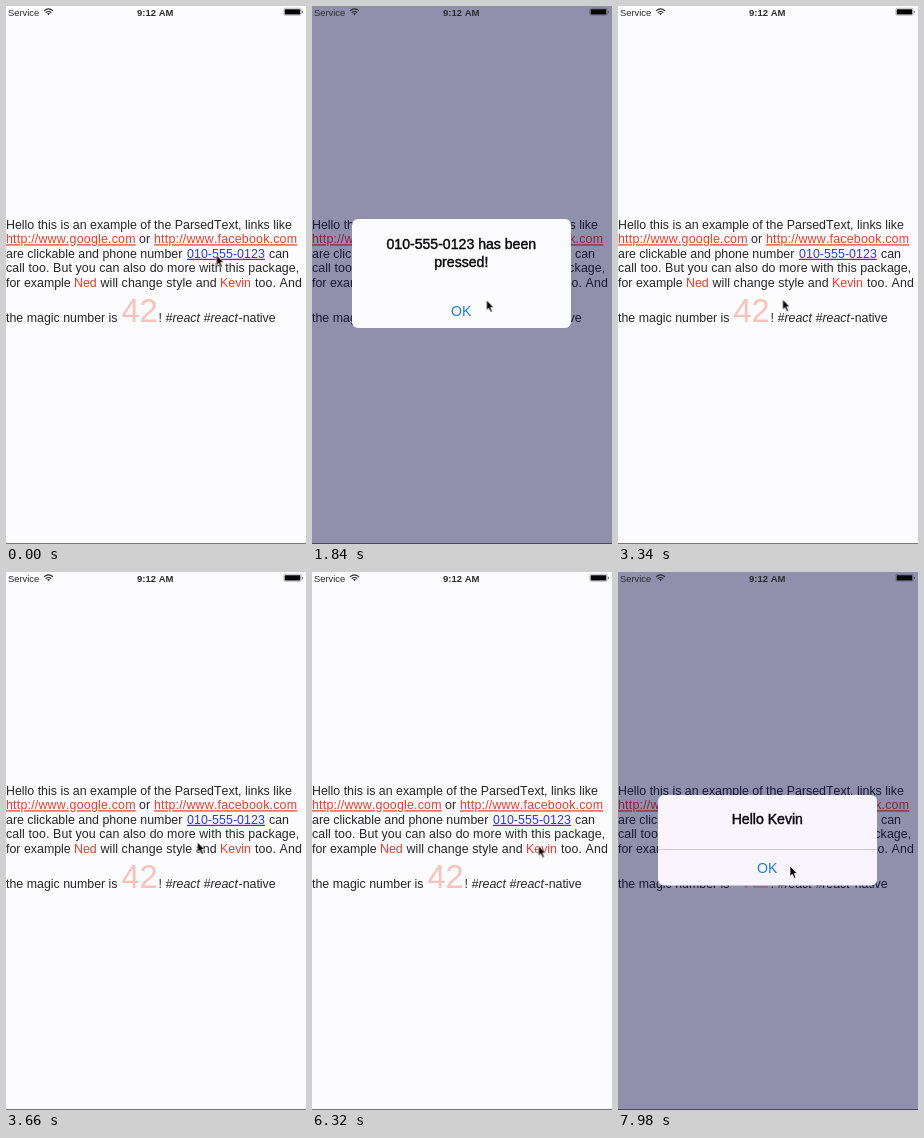
These frames come from a looping animation (300 px wide and 538 px high, 8000 ms). An HTML page:

```html
<!DOCTYPE html>
<html lang="en">
<head>
<meta charset="utf-8">
<title>ParsedText demo</title>
<style>
  html, body { margin: 0; width: 100%; height: 100%; overflow: hidden; background: #fcfcfe; }
  svg { display: block; width: 100%; height: 100%; }
  text { font-family: "Liberation Sans", Arial, sans-serif; font-kerning: none; white-space: pre; }

  .body { font-size: 12.4px; fill: #26262a; }
  .link, .name { fill: #f03c2a; }
  .link { text-decoration: underline; letter-spacing: .21px; }
  .phone { fill: #2a38e8; text-decoration: underline; letter-spacing: .06px; }
  .magic { font-size: 32.6px; fill: #f9c2b8; }
  .tag { font-style: italic; }
  .loose { letter-spacing: .09px; }
  .status { font-size: 9.4px; fill: #2c2c30; }

  .title, .ok { font-size: 14.1px; text-anchor: middle; }
  .title { fill: #050508; stroke: #050508; stroke-width: .4px; }
  .ok { fill: #1a7cf4; }

  .dim, .alert, .rule, .cursor { animation: 8s linear infinite both; }
  .dim { animation-name: dim; }
  .alert { transform-origin: 149.5px 268px; }
  .call { animation-name: call; }
  .greet { animation-name: greet; fill: #f8f5fe; }
  .rule { animation-name: rule; }
  .cursor { animation-name: cursor; }

  @keyframes dim {
    0%, 13.125% { fill: rgba(5, 5, 70, 0); }
    16.625% { fill: rgba(5, 10, 70, .43); }
    18.125%, 37.25% { fill: rgba(5, 5, 70, .44); }
    38.25% { fill: rgba(10, 40, 20, .33); }
    41.25%, 80.25% { fill: rgba(5, 5, 70, 0); }
    83.75% { fill: rgba(5, 10, 70, .43); }
    85.25%, 100% { fill: rgba(5, 5, 70, .44); }
  }
  @keyframes call {
    0%, 13.125% { opacity: 0; transform: scale(1.2); fill: #fcfbfe; }
    16.625% { opacity: .92; transform: scale(1.018); }
    18.125%, 37.25% { opacity: 1; transform: none; fill: #fcfbfe; }
    38.25% { opacity: .86; transform: none; fill: #e8e6ff; }
    41.25%, 100% { opacity: 0; transform: none; fill: #e8e6ff; }
  }
  @keyframes greet {
    0%, 80.25% { opacity: 0; transform: scale(1.2); }
    83.75% { opacity: .92; transform: scale(1.018); }
    85.25%, 100% { opacity: 1; transform: none; }
  }
  @keyframes rule {
    0%, 84% { opacity: 0; }
    86%, 100% { opacity: 1; }
  }
  @keyframes cursor {
    0%, 17% { transform: translate(210.5px, 249px); animation-timing-function: ease-in-out; }
    23%, 25% { transform: translate(174.5px, 294px); animation-timing-function: ease-in-out; }
    31%, 39.5% { transform: translate(154.5px, 302px); animation-timing-function: ease-in-out; }
    45.75%, 47% { transform: translate(191.5px, 270px); animation-timing-function: ease-in-out; }
    53%, 86% { transform: translate(226.5px, 273.5px); animation-timing-function: ease-in-out; }
    95%, 100% { transform: translate(172px, 294px); }
  }
</style>
</head>
<body>
<svg viewBox="0 0 300 538" preserveAspectRatio="none">
  <rect width="300" height="538" fill="#fcfcfe"/>

  <g class="body">
    <text y="222.8">Hello this is an example of the ParsedText, links like</text>

    <text class="link" y="237.3">http://www.google.com</text>
    <text x="133" y="237.3">or</text>
    <text class="link" x="148" y="237.3">http://www.facebook.com</text>

    <text y="251.8">are clickable and phone number</text>
    <text class="phone" x="181" y="251.8">010-555-0123</text>
    <text x="263" y="251.8">can</text>

    <text class="loose" y="266.3">call too. But you can also do more with this package,</text>

    <text y="280.8">for example</text>
    <text class="name" x="68" y="280.8">Ned</text>
    <text class="loose" x="94.5" y="280.8">will change style and</text>
    <text class="name" x="214" y="280.8">Kevin</text>
    <text class="loose" x="249" y="280.8">too. And</text>

    <text y="316.2">the magic number is</text>
    <text class="magic" x="115.5" y="316.2">42</text>
    <text x="152.5" y="316.2">!</text>
    <text class="tag" x="159.5" y="316.2">#react</text>
    <text class="tag" x="197.5" y="316.2">#react</text>
    <text x="232.5" y="316.2">-native</text>
  </g>

  <rect y="537" width="300" height="1" fill="#77777c"/>
  <rect class="dim" width="300" height="538"/>

  <g class="status">
    <text x="2" y="9.5">Service</text>
    <text x="149.3" y="9.5" text-anchor="middle" font-weight="bold" font-size="9.5">9:12 AM</text>
    <g fill="none" stroke="#2c2c30" stroke-width="1.2">
      <path d="M38 4.9Q42.5 .9 47 4.9M39.7 6.7Q42.5 4.3 45.3 6.7"/>
      <path d="M41 7.6Q42.5 6.5 44 7.6L42.5 9.3Z" fill="#2c2c30" stroke="none"/>
    </g>
    <rect x="277.8" y="2.3" width="17.4" height="7" rx="1.2" fill="none" stroke="#2c2c30" stroke-opacity=".55" stroke-width=".5"/>
    <rect x="278.7" y="3.2" width="15.6" height="5.2" rx=".6" fill="#050505"/>
    <path d="M296.2 4.4Q298 5.8 296.2 7.2Z"/>
  </g>

  <g class="alert call">
    <rect x="40" y="213" width="219" height="109" rx="6"/>
    <text class="title" x="149.3" y="243">010-555-0123 has been</text>
    <text class="title" x="149.3" y="260.6">pressed!</text>
    <text class="ok" x="149.3" y="310">OK</text>
  </g>

  <g class="alert greet">
    <rect x="40" y="223" width="219" height="90.5" rx="6"/>
    <path class="rule" d="M40 277.5H259" stroke="#cbc7d8"/>
    <text class="title" x="149.3" y="251.7">Hello Kevin</text>
    <text class="ok" x="149.3" y="301">OK</text>
  </g>

  <path class="cursor" d="M0 0V10.4L2.3 8.3L4.1 12.3L5.9 11.5L4.2 7.6H7.2Z"
        fill="#050505" stroke="#fff" stroke-width=".7"/>
</svg>
</body>
</html>
```
